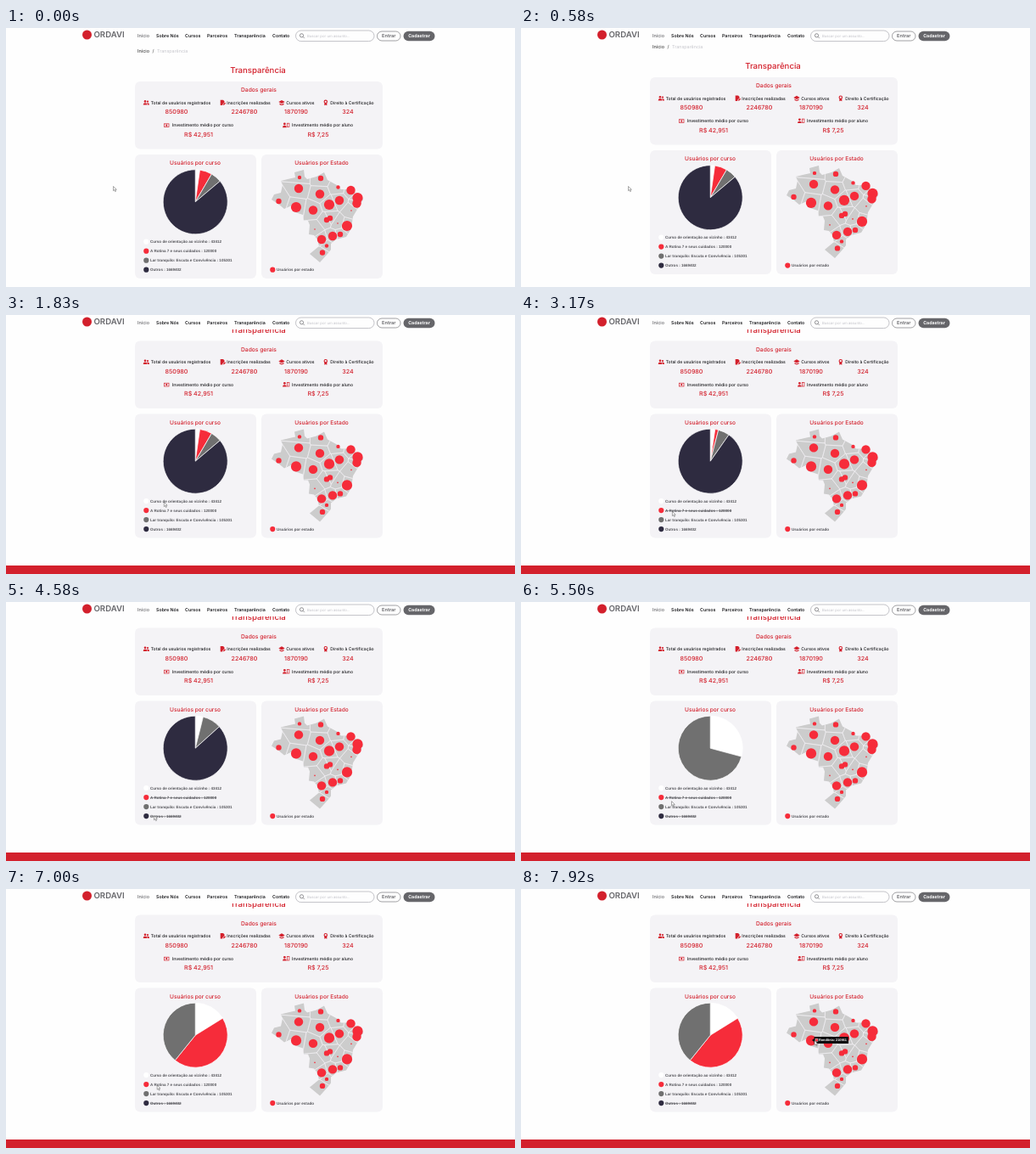
Animation of 600 by 305 pixels, one loop 8 s. Source, as an HTML page:

```html
<!DOCTYPE html>
<html lang="pt-BR">
<head>
<meta charset="utf-8">
<title>Transparência</title>
<style>
  html, body { margin: 0; width: 100%; height: 100%; overflow: hidden; background: #fefefe; }
  svg { display: block; width: 100vw; height: 100vh; }
  text { font-family: Inter, Roboto, sans-serif; text-rendering: geometricPrecision; }
  .chart { font-family: "Liberation Sans", sans-serif; }
  .struck { text-decoration: line-through; text-decoration-thickness: .7px; }
</style>
</head>
<body>
<svg viewBox="0 0 600 305">
  <defs>
    <path id="country" stroke-linejoin="round" d="M351 167 352 175 355 178 366 175 375 170 379 179 390 185 395 190 407 190 414 195 419 196 421 202 415 212 409 222 407 236 401 246 389 249 383 254 383 261 379 266 370 276 358 266 369 257 367 249 363 244 357 243 358 232 356 227 351 227 350 220 338 216 337 209 328 213 322 208 313 202 316 196 324 194 326 185 324 180 332 178 341 176 340 170Z"/>
    <clipPath id="inland"><use href="#country"/></clipPath>
  </defs>
  <g id="page">
    <g id="content"></g>
    <g fill="#d3202c">
      <path d="M161.7 90.5q0-2.3 2.3-2.3t2.3 2.3zM166.8 90.5q0-1.5-.8-2.2 3-.5 3 2.2z"/><circle cx="164" cy="86.4" r="1.3"/><circle cx="167" cy="86.6" r="1.1"/>
      <path d="M252.7 84.7h3.3l1.5 1.5v1.3l-2.2 2.4v1.1h-2.6zM256 90.9l.3-1.3 1.8-1.8 1 1-1.8 1.8z"/>
      <path d="M321.3 87l3.7-2.1 3.7 2.1-3.7 2.1zM322.5 88.6l2.5 1.4 2.5-1.4v1.6q-2.5 1.6-5 0z"/>
      <path d="M375.3 88.6h3v2.7l-1.5-.8-1.5.8z"/><circle cx="376.8" cy="86.8" r="1.7" fill="none" stroke="#d3202c" stroke-width="1.1"/>
      <rect x="186.4" y="112.8" width="5.6" height="3.8" fill="none" stroke="#d3202c" stroke-width=".7"/><circle cx="189.2" cy="114.7" r="1.1"/>
      <circle cx="328.4" cy="112.9" r="1.4"/><path d="M326 117.2q0-2.4 2.4-2.4t2.4 2.4z"/><rect x="331.5" y="112.2" width="2.4" height="4.4" fill="none" stroke="#d3202c" stroke-width=".7"/>
    </g>
    <g id="pie" transform="translate(223.2 204.8)" stroke="#fff" stroke-width=".7" stroke-linejoin="round"></g>
    <use href="#country" fill="#ccc"/>
    <g id="borders" clip-path="url(#inland)" fill="none" stroke="#f4f3f6" stroke-width=".5"></g>
    <g id="bubbles" fill="#f62c3a"></g>
  </g>
  <g id="header"></g>
  <g id="tip">
    <path fill="#0c0c0e" d="M343 178l2.6-2v-2h40.4v8h-40.4v-2z"/>
    <rect x="347" y="176.3" width="3" height="3" fill="#f62c3a" stroke="#fff" stroke-width=".4"/>
  </g>
  <path id="cursor" fill="#fff" stroke="#555" stroke-width=".5" d="M0 0V5.2L1.3 4.1 2.2 6.2 3 5.8 2.2 3.8H3.8Z"/>
</svg>
<script>
const $ = id => document.getElementById(id);
const add = (id, ...markup) => $(id).insertAdjacentHTML('beforeend', markup.join(''));

const RED = '#d3202c', BRIGHT = '#f62c3a', GREY = '#707070', DARK = '#2e2b40';
const BLACK = '#1c1c1f', SLATE = '#66666a', PAPER = '#fefefe', PANEL = '#f4f3f6';

const clamp = v => Math.min(1, Math.max(0, v));
const mix = (a, b, p) => a + (b - a) * p;
const easeInOut = p => (1 - Math.cos(Math.PI * clamp(p))) / 2;
const easeOutQuart = p => 1 - (1 - clamp(p)) ** 4;

// y is the middle of the capitals.
function text(x, y, content, size, fill, weight = 500, attributes = '') {
  return `<text x="${x}" y="${y + size * .36}" font-size="${size}" fill="${fill}" ` +
    `font-weight="${weight}" ${attributes}>${content}</text>`;
}
const middle = (x, y, content, size, fill, weight) =>
  text(x, y, content, size, fill, weight, 'text-anchor="middle"');
const box = (x, y, w, h, r, fill, stroke = 'none') =>
  `<rect x="${x}" y="${y}" width="${w}" height="${h}" rx="${r}" fill="${fill}" stroke="${stroke}" stroke-width=".7"/>`;
const dot = (x, y, r, fill = BRIGHT) => `<circle cx="${x}" cy="${y}" r="${r}" fill="${fill}"/>`;
const legend = (x, y, label, color, id = '') => dot(x - 4.7, y, 3.1, color) +
  text(x, y, label, 4.55, '#55555a', 700, `class="chart" id="${id}"`);

// Page
add('content',
  text(155, 27, 'Início', 5.5, '#444'), text(172.5, 27, '/', 5.4, '#555'),
  text(178, 27, 'Transparência', 5.4, '#c6c6cc', 400),
  middle(297, 50, 'Transparência', 9.6, RED),
  box(152, 63, 292, 79.5, 6, PANEL), box(152, 149, 143, 146, 6, PANEL), box(301, 149, 143, 146, 6, PANEL),
  box(0, 327.6, 600, 60, 0, RED),
  middle(298, 72.8, 'Dados gerais', 6.7, RED),
  middle(223, 158.8, 'Usuários por curso', 6.6, RED),
  middle(372, 158.8, 'Usuários por Estado', 6.6, RED),
  legend(319, 284.7, 'Usuários por estado', BRIGHT));

function stat(x, y, label, value) {
  add('content', middle(x + 5, y, label, 5.1, BLACK), middle(x, y + 11, value, 7.1, RED));
}
stat(201, 87.8, 'Total de usuários registrados', '850980');
stat(281, 87.8, 'Inscrições realizadas', '2246780');
stat(342, 87.8, 'Cursos ativos', '1870190');
stat(403, 87.8, 'Direito à Certificação', '324');
stat(227, 114.5, 'Investimento médio por curso', 'R$ 42,951');
stat(368, 114.5, 'Investimento médio por aluno', 'R$ 7,25');

// Header
add('header', box(0, 0, 600, 17, 0, PAPER),
  dot(95.5, 8, 5.5, RED), text(103.5, 8, 'ORDAVI', 9.6, SLATE, 600),
  text(155, 9, 'Início', 5.5, SLATE),
  text(177, 9, 'Sobre Nós', 5.3, BLACK, 600), text(211, 9, 'Cursos', 5.3, BLACK, 600),
  text(237, 9, 'Parceiros', 5.3, BLACK, 600), text(269, 9, 'Transparência', 5.3, BLACK, 600),
  text(314, 9, 'Contato', 5.3, BLACK, 600),
  box(341.5, 3, 92.5, 12.6, 6.3, PAPER, '#aaaab0'),
  `<path d="M350.1 10.4l1.7 1.7M350.6 8.8a2.1 2.1 0 1 1-4.2 0 2.1 2.1 0 0 1 4.2 0z" fill="none" stroke="${SLATE}" stroke-width=".7"/>`,
  text(355, 9.2, 'Buscar por um assunto...', 4.3, '#c2c2c8', 400),
  box(437.5, 4, 27.5, 11, 5.5, PAPER, '#77777b'), middle(451.3, 9.4, 'Entrar', 5.6, SLATE, 600),
  box(468.5, 3.7, 37, 11.6, 5.8, SLATE), middle(487, 9.4, 'Cadastrar', 5.3, '#fff', 700));
add('tip', text(351, 178, 'Rondônia: 210961', 3.85, '#fff', 700, 'class="chart"'));

// Map: one bubble per state, grouped by radius
const bubbles = {
  6.1: [[414.5, 200], [381, 208], [342, 211], [402, 233]],
  5.2: [[345, 189], [370, 195.5], [406.5, 191], [393, 203], [372, 249], [385, 245], [362, 214.5], [413.5, 206.5]],
  3.2: [[371, 177], [321.5, 204], [378, 226], [382, 224], [394, 243], [373, 264.5]],
  2.2: [[346, 176], [391.5, 187.5], [378, 256.5]],
  0.8: [[407, 215], [364, 237], [391, 230]],
};
const sites = Object.values(bubbles).flat();
for (const [radius, points] of Object.entries(bubbles))
  add('bubbles', ...points.map(([x, y]) => dot(x, y, radius)));

// State borders: each state is the area nearest to its bubble.
function stateOutline(site) {
  const away = (p, q) => (p[0] - q[0]) ** 2 + (p[1] - q[1]) ** 2;
  let outline = [[300, 160], [430, 160], [430, 280], [300, 280]];
  for (const other of sites) {
    if (other === site) continue;
    const lead = p => away(p, other) - away(p, site);
    outline = outline.flatMap((p, i) => {
      const q = outline[(i + 1) % outline.length], a = lead(p), b = lead(q);
      const kept = a >= 0 ? [p] : [];
      if (a * b < 0) kept.push(p.map((v, axis) => mix(v, q[axis], a / (a - b))));
      return kept;
    });
  }
  return outline;
}
add('borders', ...sites.map(site => `<polygon points="${stateOutline(site).join(' ')}"/>`));

// Pie: each click on the legend leads to a new set of visible slices.
const slices = [
  ['Curso de orientação ao vizinho', 43412, '#fff'],
  ['A Rotina 7 e seus cuidados', 120000, BRIGHT],
  ['Lar tranquilo: Escuta e Convivência', 105301, GREY],
  ['Outros', 1669402, DARK],
];
slices.forEach(([name, count, color], i) => {
  add('content', legend(170, 251.7 + 11 * i, `${name} : ${count}`, color, 'label' + i));
  add('pie', `<path fill="${color}"/>`);
});

const states = [
  { at: 0, hidden: [] },
  { at: 2890, hidden: [1] },
  { at: 4569, hidden: [1, 3] },
  { at: 5962, hidden: [3] },
];
for (const state of states) {
  const values = slices.map(([, count], i) => state.hidden.includes(i) ? 0 : count);
  const total = values.reduce((a, b) => a + b);
  let sum = 0;
  state.ends = values.map(v => (sum += v) / total * 2 * Math.PI);
}

function slicePath(start, end, r = 38) {
  if (end - start < .001) return '';
  const point = a => `${r * Math.sin(a)} ${-r * Math.cos(a)}`;
  return `M0 0L${point(start)}A${r} ${r} 0 ${+(end - start > Math.PI)} 1 ${point(end)}Z`;
}

function drawPie(t) {
  const current = states.findLastIndex(s => t >= s.at);
  const { at, hidden, ends } = states[current];
  const before = states[Math.max(0, current - 1)].ends;
  const p = easeOutQuart((t - at) / 1000);
  let start = 0;
  [...$('pie').children].forEach((path, i) => {
    const end = mix(before[i], ends[i], p);
    path.setAttribute('d', slicePath(start, end));
    start = end;
    $('label' + i).classList.toggle('struck', hidden.includes(i));
  });
}

const pointerMoves = [
  { from: 950, to: 1690, x: 186.3, y: 220.4 },
  { from: 2540, to: 2800, x: 178.5, y: 231 },
  { from: 3100, to: 3820, x: 174.5, y: 251.5 },
  { from: 4980, to: 5700, x: 178.2, y: 231 },
  { from: 7200, to: 7900, x: 346, y: 178.5 },
];

function drawPointer(t) {
  let x = 126.5, y = 186.5;
  for (const move of pointerMoves) {
    const p = easeInOut((t - move.from) / (move.to - move.from));
    x = mix(x, move.x, p);
    y = mix(y, move.y, p);
  }
  $('cursor').setAttribute('transform', `translate(${x} ${y})`);
}

function draw(now) {
  // The picture changes 12 times per second.
  const t = Math.floor(now % 8000 * .012 + .09) % 96 / .012;
  $('page').setAttribute('transform', `translate(0 ${-32.6 * easeInOut((t - 520) / 245)})`);
  drawPie(t);
  drawPointer(t);
  $('tip').style.display = t >= 7830 ? '' : 'none';
}

const began = performance.now();
function tick() {
  draw(performance.now() - began);
  requestAnimationFrame(tick);
}
tick();
</script>
</body>
</html>
```
